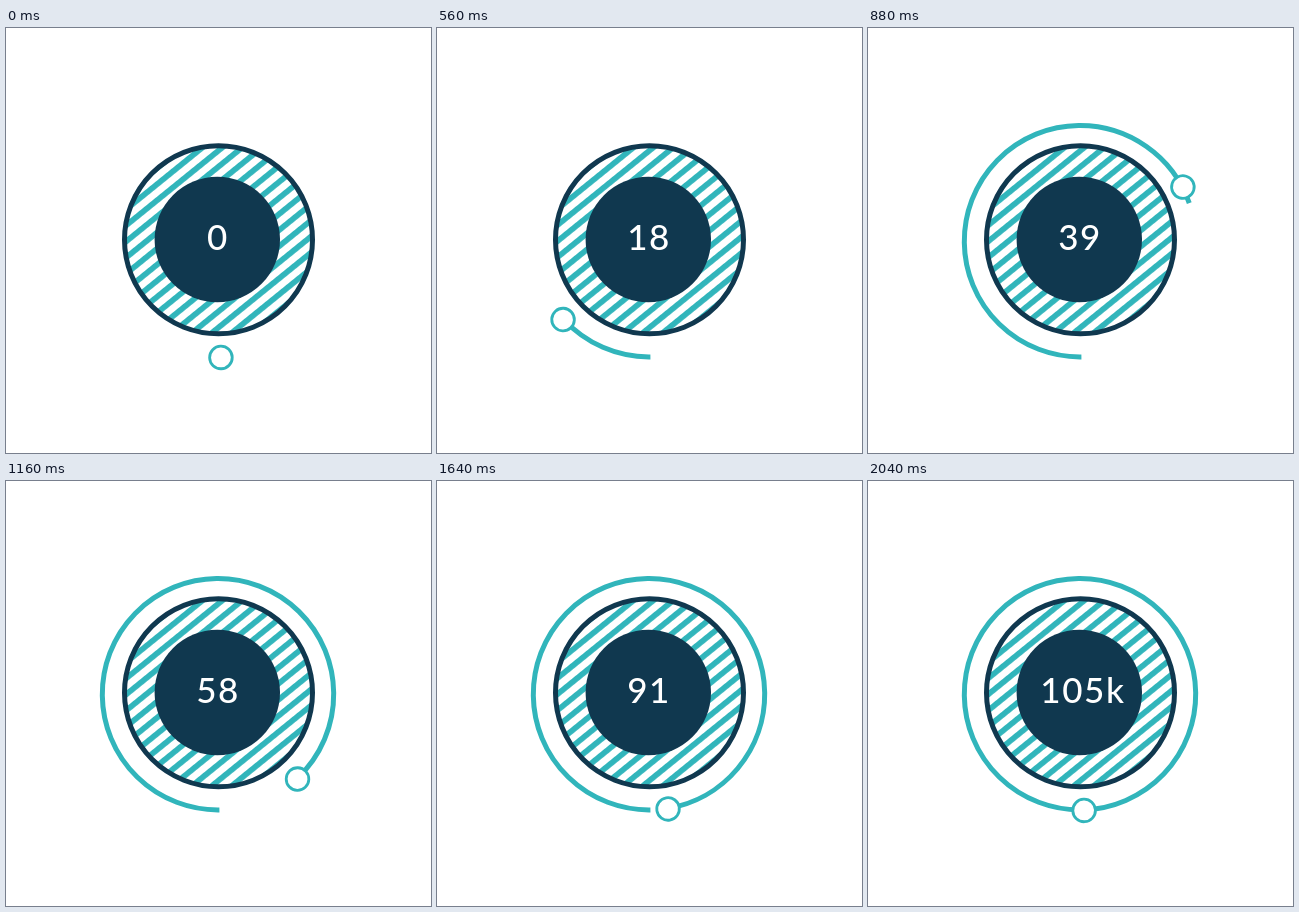
Animation of 425 by 425 pixels, one loop 2560 ms. Source, as an HTML page without scripts:

```html
<!DOCTYPE html>
<html lang="en">
<head>
<meta charset="utf-8">
<title>Dial counter</title>
<style>
  /* --k counts 40 ticks of 40 ms; every pose is derived from it */
  @property --k { syntax: "<number>"; inherits: true; initial-value: 0; }
  @property --n { syntax: "<integer>"; inherits: true; initial-value: 0; }

  html, body {
    margin: 0;
    width: 100%;
    height: 100%;
    overflow: hidden;
    background: #fff;
  }
  body { animation: tick 2560ms infinite; }
  @keyframes tick {
    0% { --k: 0; }
    10.9% { --k: 0; animation-timing-function: steps(40, end); }
    73.4%, 100% { --k: 40; }
  }

  .stage {
    --navy: #10384f;
    --teal: #31b5bb;
    position: relative;
    width: 425px;
    height: 425px;

    /* speeding up for 15 ticks, then a long slow-down */
    --u: min(var(--k), 15);
    --v: min(40 - var(--k), 25);
    --w: max(0, var(--v) - 18);
    --rise: calc(var(--u) * var(--u) * (.302 + var(--u) * (.1419 - .005989 * var(--u))));
    --rest: calc(var(--v) * (1.163 + var(--v) * (.00422 * var(--v) - .0137))
      + .0122 * var(--w) * var(--w) * var(--w) * var(--w));
    --angle: calc(var(--rise) + 114.3 - var(--rest));

    /* the trail runs ahead of the knob in mid-turn */
    --lead: max(0, 16.9 - .815 * (var(--k) - 11.8) * (var(--k) - 11.8));
    --n: calc(max(0, min(105, 2.7 * var(--k) - 1.05)));
  }
  svg { display: block; }
  .trail {
    fill: none;
    stroke: var(--teal);
    stroke-width: 5;
    stroke-dasharray: calc(max(0, var(--angle) + .7 + var(--lead)) * 1px) 400px;
  }
  .knob {
    fill: #fff;
    stroke: var(--teal);
    stroke-width: 2.8;
    transform-origin: 212px 213.2px;
    transform: rotate(calc(var(--angle) * 1deg));
  }
  .ring { stroke: var(--navy); stroke-width: 5; }
  .hub { fill: var(--navy); }
  .stripe { fill: var(--teal); }

  .count {
    position: absolute;
    top: 187px;
    left: 0;
    width: 424px;
    text-align: center;
    white-space: nowrap;
    font: 500 35px/42px Lato, sans-serif;
    letter-spacing: .045em;
    color: #fff;
  }
  .count::before {
    counter-reset: n var(--n);
    content: counter(n);
  }
  .unit {
    font-size: calc(max(0, var(--k) - 39) * 1em);
    letter-spacing: .045em;
    margin-right: -.17em;
  }
</style>
</head>
<body>
<div class="stage">
  <svg width="425" height="425" viewBox="0 0 425 425">
    <defs>
      <pattern id="stripes" width="20" height="12.5" patternUnits="userSpaceOnUse"
               patternTransform="translate(215.2 132.8) rotate(-39)">
        <rect class="stripe" width="20" height="5.7"/>
      </pattern>
    </defs>
    <circle class="ring" cx="212.5" cy="211.8" r="94" fill="url(#stripes)"/>
    <circle class="hub" cx="211.3" cy="211.5" r="62.7"/>
    <circle class="trail" cx="212" cy="213.2" r="115.7" pathLength="360"
            transform="rotate(89.3 212 213.2)"/>
    <circle class="knob" cx="212" cy="329.5" r="11.3"/>
  </svg>
  <div class="count"><span class="unit">k</span></div>
</div>
</body>
</html>
```
